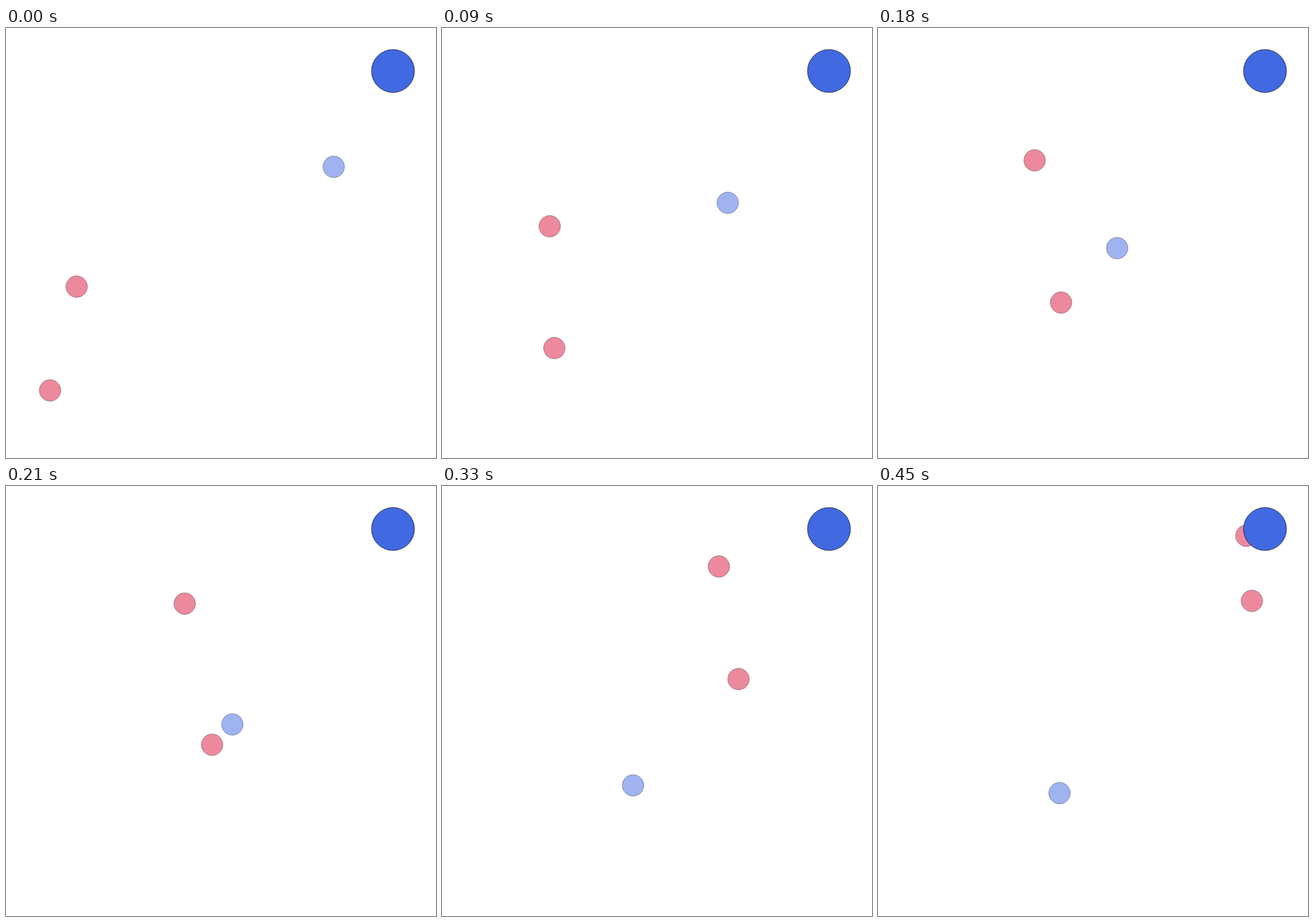
Write an HTML page with a canvas that moves like this. It is 700 px wide and 700 px high and loops after 0.48 s.

```html
<!DOCTYPE html>
<html lang="en">
<head>
<meta charset="utf-8">
<title>Moving circles</title>
<style>
  html, body { margin: 0; width: 100%; height: 100%; overflow: hidden; background: #fff; }
  canvas { display: block; }
</style>
</head>
<body>
<canvas id="stage" width="700" height="700"></canvas>
<script>
const ctx = document.getElementById("stage").getContext("2d");
const STEP_MS = 30;
const STEPS = 16;
const BLUE = "#4169e1";
const RED = "#dc143c";

// Steps at which the waypoints of every path are reached.
const knots = [0, 2, 4, 6, 9, 11, 15];

const movers = [
  {
    color: RED,
    x: [115, 155.5, 197, 255, 371, 450.7, 599.6],
    y: [421, 361.5, 283, 215.5, 154.5, 131, 81]
  },
  {
    color: RED,
    x: [71.7, 144.5, 221.8, 298, 409.7, 482.7, 608.6],
    y: [590, 544.8, 496.8, 447, 368.5, 314.3, 187]
  },
  {
    color: BLUE,
    x: [533.5, 490.6, 438.8, 389.3, 333.8, 311, 295.5],
    y: [226, 262, 309, 358.4, 447.4, 487.4, 500]
  }
];

// Monotone cubic curve through the waypoints of one coordinate.
function monotoneCurve(values) {
  const last = knots.length - 1;
  const widths = knots.slice(1).map((k, i) => k - knots[i]);
  const rates = widths.map((w, i) => (values[i + 1] - values[i]) / w);

  const endSlope = (w0, w1, r0, r1) => {
    const slope = ((2 * w0 + w1) * r0 - w0 * r1) / (w0 + w1);
    return slope * r0 <= 0 ? 0 : slope;
  };

  const slopes = knots.map((_, i) => {
    if (i === 0) return endSlope(widths[0], widths[1], rates[0], rates[1]);
    if (i === last) {
      return endSlope(widths[i - 1], widths[i - 2], rates[i - 1], rates[i - 2]);
    }
    const before = rates[i - 1], after = rates[i];
    if (before * after <= 0) return 0;
    const a = 2 * widths[i] + widths[i - 1];
    const b = widths[i] + 2 * widths[i - 1];
    return (a + b) / (a / before + b / after);
  });

  return step => {
    let i = 0;
    while (i < last - 1 && step >= knots[i + 1]) i++;
    const w = widths[i];
    const u = (step - knots[i]) / w;
    const v = 1 - u;
    return v * v * ((1 + 2 * u) * values[i] + u * w * slopes[i]) +
           u * u * ((3 - 2 * u) * values[i + 1] - v * w * slopes[i + 1]);
  };
}

const paths = movers.map(({ color, x, y }) => ({
  color,
  x: monotoneCurve(x),
  y: monotoneCurve(y)
}));

function circle(x, y, radius, color, alpha) {
  ctx.globalAlpha = alpha;
  ctx.fillStyle = color;
  ctx.strokeStyle = "#000";
  ctx.lineWidth = 0.7;
  ctx.beginPath();
  ctx.arc(x, y, radius, 0, Math.PI * 2);
  ctx.fill();
  ctx.stroke();
}

function draw(step) {
  ctx.globalAlpha = 1;
  ctx.fillStyle = "#fff";
  ctx.fillRect(0, 0, 700, 700);
  for (const path of paths) {
    circle(path.x(step), path.y(step), 17.5, path.color, 0.5);
  }
  circle(630, 70, 35, BLUE, 1);
}

let start = null;

function tick(now) {
  if (start === null) start = now;
  draw(Math.floor((now - start) / STEP_MS) % STEPS);
  requestAnimationFrame(tick);
}

draw(0);
requestAnimationFrame(tick);
</script>
</body>
</html>
```
